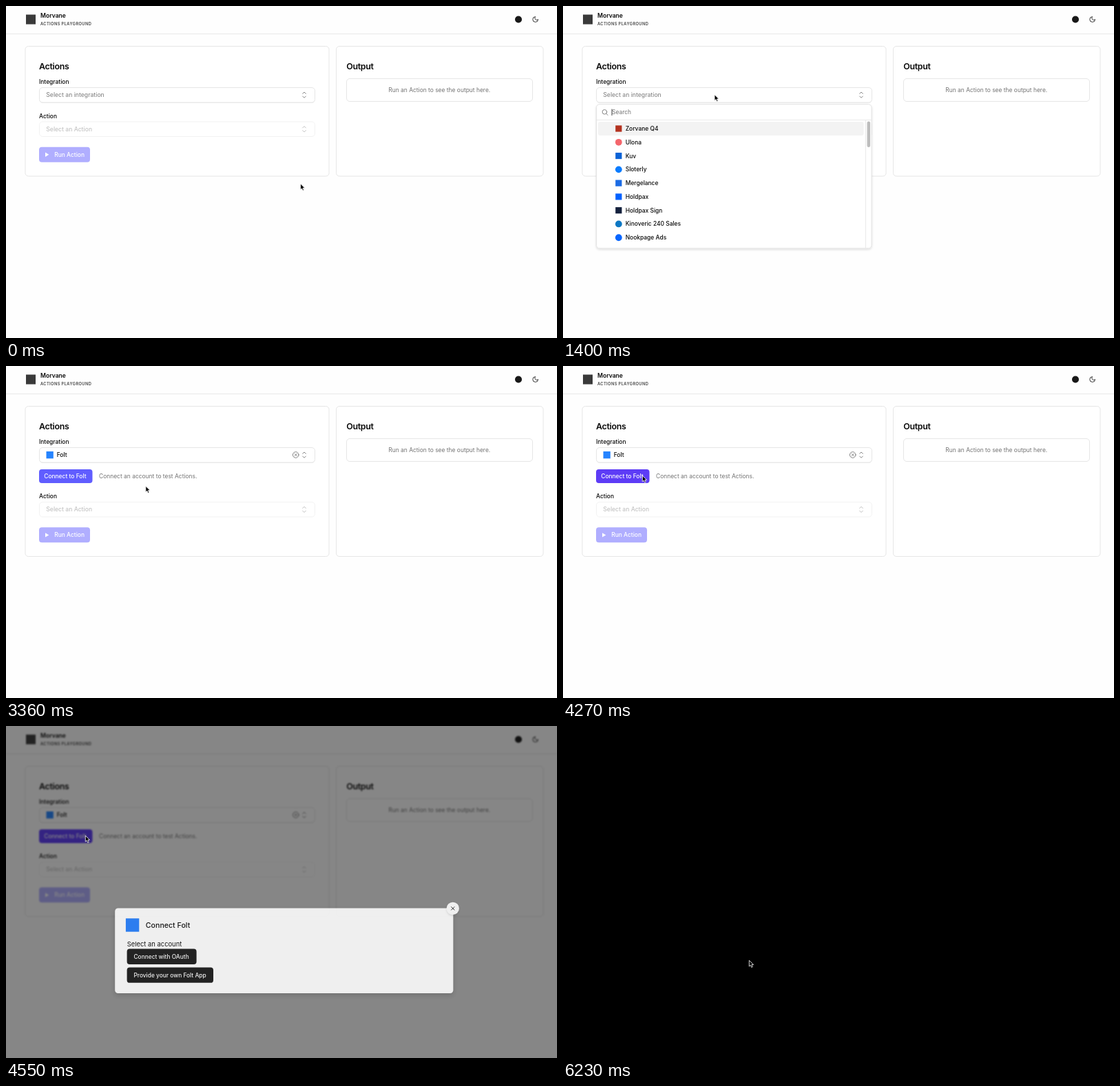
Write an HTML page that moves like this. It is 800 px wide and 482 px high and loops after 8000 ms.

```html
<!DOCTYPE html>
<html lang="en">
<head>
<meta charset="utf-8">
<title>Actions Playground</title>
<style>
html, body { margin: 0; width: 100%; height: 100%; overflow: hidden; background: #fff; }
svg { display: block; font: 400 8.45px Inter, sans-serif; fill: #0a0a0a; }
.m { font-weight: 500; }
.h { font-weight: 600; font-size: 12.4px; letter-spacing: -.025em; }
.muted { fill: #737373; }
.ph { fill: #8b8b8b; font-weight: 500; font-size: 8.6px; }
.line { fill: none; stroke: #e9e9e9; }
.panel { fill: #fff; stroke: #e6e6e6; }
.icon { fill: none; stroke: #777; stroke-width: .9; stroke-linecap: round; stroke-linejoin: round; }
.white { fill: #fff; }
</style>
</head>
<body>
<svg width="800" height="482" xmlns="http://www.w3.org/2000/svg">
  <defs>
    <filter id="soft" x="-10%" y="-10%" width="120%" height="130%">
      <feDropShadow dx="0" dy="1.5" stdDeviation="1.6" flood-opacity=".14"/>
    </filter>
    <filter id="lift" x="-5%" y="-20%" width="110%" height="150%">
      <feDropShadow dx="0" dy="3" stdDeviation="4" flood-opacity=".18"/>
    </filter>
    <path id="chevrons" class="icon" d="M430.7 127.3 433 125l2.3 2.3M430.7 131 433 133.3l2.3-2.3"/>
  </defs>

  <g id="page">
    <rect width="800" height="482" fill="#fefefe"/>
    <rect x="29" y="12.5" width="14" height="14" fill="#3a3a3a"/>
    <text x="50" y="17.3" font-weight="600" font-size="8.6">Morvane</text>
    <text x="50" y="28" font-weight="600" font-size="5.7" letter-spacing=".42" fill="#404040">ACTIONS PLAYGROUND</text>
    <circle cx="744" cy="19.5" r="5" fill="#181818"/>
    <path d="M12 3a6 6 0 0 0 9 9 9 9 0 1 1-9-9Z" transform="translate(763.5 14.3) scale(.43)"
      fill="none" stroke="#222" stroke-width="2.1" stroke-linejoin="round"/>
    <path class="line" d="M0 40.5H800"/>

    <rect id="card1" class="panel" x="28" y="58.5" width="441" rx="4.5"/>
    <rect id="card2" class="panel" x="479.5" y="58.5" width="300.5" rx="4.5"/>
    <text class="h" x="48" y="91.7">Actions</text>
    <text class="m" x="48" y="113.1">Integration</text>
    <rect x="48.5" y="119.5" width="400" height="21.5" rx="4.5" fill="#f0f0f0"/>
    <rect class="panel" x="48.5" y="118.5" width="400" height="21.5" rx="4.5"/>
    <use href="#chevrons"/>
    <text id="hint" class="ph" x="58.3" y="132.1">Select an integration</text>
    <g id="picked">
      <rect x="58.5" y="124" width="10.3" height="10.3" fill="#2684ff"/>
      <text class="m" x="73.7" y="132.1">Folt</text>
      <circle class="icon" cx="420.7" cy="129" r="4.3"/>
      <path class="icon" d="m419.1 127.4 3.2 3.2m0-3.2-3.2 3.2"/>
      <rect id="connect" x="48" y="150" width="77.5" height="20" rx="4"/>
      <text class="m white" x="55.2" y="163.1">Connect to Folt</text>
      <text class="muted" x="135" y="163.1">Connect an account to test Actions.</text>
    </g>
    <g id="lower">
      <text class="m" x="48" y="162.5">Action</text>
      <g opacity=".5">
        <rect class="panel" x="48.5" y="168" width="400" height="21.5" rx="4.5"/>
        <use href="#chevrons" y="49.6"/>
        <text class="ph" x="58.3" y="181.7">Select an Action</text>
      </g>
      <rect x="48" y="204.7" width="74" height="22" rx="4" fill="#b0aeff"/>
      <path class="white" d="M57 212.6v6.4l5.3-3.2Z"/>
      <text class="m white" x="70.2" y="218.8">Run Action</text>
    </g>
    <text class="h" x="494.3" y="91.7">Output</text>
    <rect class="panel" x="494.5" y="105.5" width="270" height="33" rx="4.5"/>
    <text class="muted" x="629.3" y="125.2" text-anchor="middle">Run an Action to see the output here.</text>
  </g>

  <g id="menu">
    <rect x="48.5" y="142.8" width="399.5" height="209" rx="4.5" fill="#fff" stroke="#e2e2e2" filter="url(#soft)"/>
    <circle class="icon" cx="60.4" cy="153.8" r="3.3"/>
    <path class="icon" d="m62.9 156.3 2.2 2.2"/>
    <text id="query" x="71" y="157.3"></text>
    <path id="caret" d="M0 149.6V159" stroke="#111" stroke-width=".8"/>
    <path class="line" d="M49 165.5H448"/>
    <rect x="51" y="168" width="385.5" height="20" rx="3" fill="#f3f3f3"/>
    <g id="list">
      <path class="line" d="M439.5 166V351.5"/>
      <rect x="441.5" y="167.5" width="4.6" height="37.5" rx="2.3" fill="#bdbdbd"/>
    </g>
    <g id="match"></g>
  </g>

  <rect id="shade" width="800" height="482"/>

  <g id="dialog">
    <rect x="156.5" y="264" width="494.5" height="124.5" rx="4.5" fill="#fff" filter="url(#lift)"/>
    <rect x="172.3" y="279" width="19.5" height="19.5" fill="#1f7cff"/>
    <text class="m" x="201.4" y="292.9" font-size="10.7">Connect Folt</text>
    <text x="174.2" y="319.7" font-size="9.45">Select an account</text>
    <rect id="oauth" x="174" y="323.5" width="101.7" height="22.7" rx="4"/>
    <text class="m white" x="183.9" y="338">Connect with OAuth</text>
    <rect x="174" y="350.7" width="126.3" height="22.5" rx="4" fill="#151515"/>
    <text class="m white" x="183.9" y="365">Provide your own Folt App</text>
    <circle cx="650.5" cy="264.4" r="9.2" fill="#fff" filter="url(#soft)"/>
    <path d="m648 261.9 5 5m0-5-5 5" stroke="#222" stroke-width="1"/>
  </g>

  <rect id="black" width="800" height="482" fill="#000"/>
  <g id="cursor" stroke="#fff" stroke-width=".8" stroke-linejoin="round" fill="#000">
    <path id="arrow" d="M0 0V8.7L2 6.9 3.4 10.1 5 9.4 3.6 6.3 6.3 6.2Z"/>
    <path id="hand" d="M-1 .7Q-.2-.4.6.7L1.2 4 1.8 3.4 3 4 4 3.8 5 4.5 6 4.9V7.5L5 11H.7L-2.8 6.8Q-2.5 5.5-1 6.5Z"/>
  </g>
</svg>
<script>
const LOOP = 8000, STEP = 70;
const el = id => document.getElementById(id);
const set = (id, attrs) => { for (const k in attrs) el(id).setAttribute(k, attrs[k]); };
const show = (id, on) => set(id, { visibility: on ? 'visible' : 'hidden' });
const smooth = k => k * k * (3 - 2 * k);
const linear = k => k;

// Interpolates keys of the form [time, value, value, ...].
function track(keys, t, ease = linear) {
  let i = 0;
  while (i < keys.length - 1 && t >= keys[i + 1][0]) i++;
  const a = keys[i], b = keys[i + 1];
  if (!b || t <= a[0]) return a.slice(1);
  const k = ease((t - a[0]) / (b[0] - a[0]));
  return a.slice(1).map((v, n) => v + (b[n + 1] - v) * k);
}

function row(y, name, color, round) {
  const icon = round
    ? `<circle cx="80.8" cy="${y}" r="4.9" fill="${color}"/>`
    : `<rect x="76.2" y="${y - 4.6}" width="9.2" height="9.2" fill="${color}"/>`;
  return `${icon}<text class="m" x="90.7" y="${y + 3}">${name}</text>`;
}

const apps = [
  ['Zorvane Q4', '#b3321f'], ['Ulona', '#f4666c', true], ['Kuv', '#0c62d6'],
  ['Sloterly', '#0a7cff', true], ['Mergelance', '#1b6be4'], ['Holdpax', '#0061ff'],
  ['Holdpax Sign', '#14213d'], ['Kinoveric 240 Sales', '#0d78c4', true], ['Nookpage Ads', '#0866ff', true]
];
el('list').innerHTML += apps.map((a, i) => row(178 + i * 19.78, ...a)).join('');
el('match').innerHTML = row(178, 'Folt', '#2684ff');

const path = [
  [0, 427.5, 258], [350, 427.5, 258], [1120, 220, 128.7], [2590, 220, 128.7],
  [3430, 202.5, 175.3], [3640, 202.5, 175.3], [4270, 115.3, 159.2], [5040, 115.3, 159.2],
  [5530, 272, 344], [5600, 272, 344], [5810, 270.3, 340.3]
];
const menuFade = [[1120, 0], [1190, .45], [1260, .9], [1330, 1], [2310, 1], [2380, .6], [2450, .15], [2520, 0]];
const modal = [ // shade, dialog opacity, scale, blur
  [4410, 0, 0, .94, 0], [4480, .23, .335, .966, 0], [4550, .49, .87, .993, 1.3], [4690, .5, 1, 1, 1.3]
];

function draw(t) {
  const picked = t >= 2380, dark = t >= 6230;
  const [x, y] = track(path, t, smooth);

  show('hint', !picked);
  show('picked', picked);
  set('lower', { transform: `translate(0 ${picked ? 29.6 : 0})` });
  for (const id of ['card1', 'card2']) set(id, { height: picked ? 218 : 188.5 });
  set('connect', { fill: t > 3640 && x < 125.5 && y < 170 ? '#5d3cf6' : '#605dff' });

  const [menu] = track(menuFade, t);
  set('menu', { opacity: menu });
  const typed = 'folt'.slice(0, Math.max(0, Math.floor((t - 1610) / STEP) + 1));
  const query = el('query');
  query.textContent = typed || 'Search';
  set('query', { fill: typed ? '#0a0a0a' : '#737373' });
  const caretX = typed ? 71.4 + query.getComputedTextLength() : 71;
  set('caret', { transform: `translate(${caretX} 0)` });
  set('list', { display: t < 2100 ? 'inline' : 'none' });
  set('match', { display: t < 2100 ? 'none' : 'inline' });

  const [shade, alpha, scale, blur] = track(modal, t);
  set('shade', { opacity: shade });
  el('page').style.filter = blur ? `blur(${blur}px)` : 'none';
  set('dialog', {
    opacity: alpha,
    transform: `translate(403.5 326) scale(${scale}) translate(-403.5 -326)`
  });
  const hover = t > 5040 && y > 323.5;
  set('oauth', { fill: hover ? '#333' : '#151515' });

  show('black', dark);
  set('cursor', { transform: `translate(${x} ${y})` });
  show('hand', hover && !dark);
  show('arrow', !hover || dark);
}

function tick() {
  const t = performance.now() % LOOP;
  draw(Math.floor(t / STEP) * STEP);
  requestAnimationFrame(tick);
}
tick();
</script>
</body>
</html>
```
